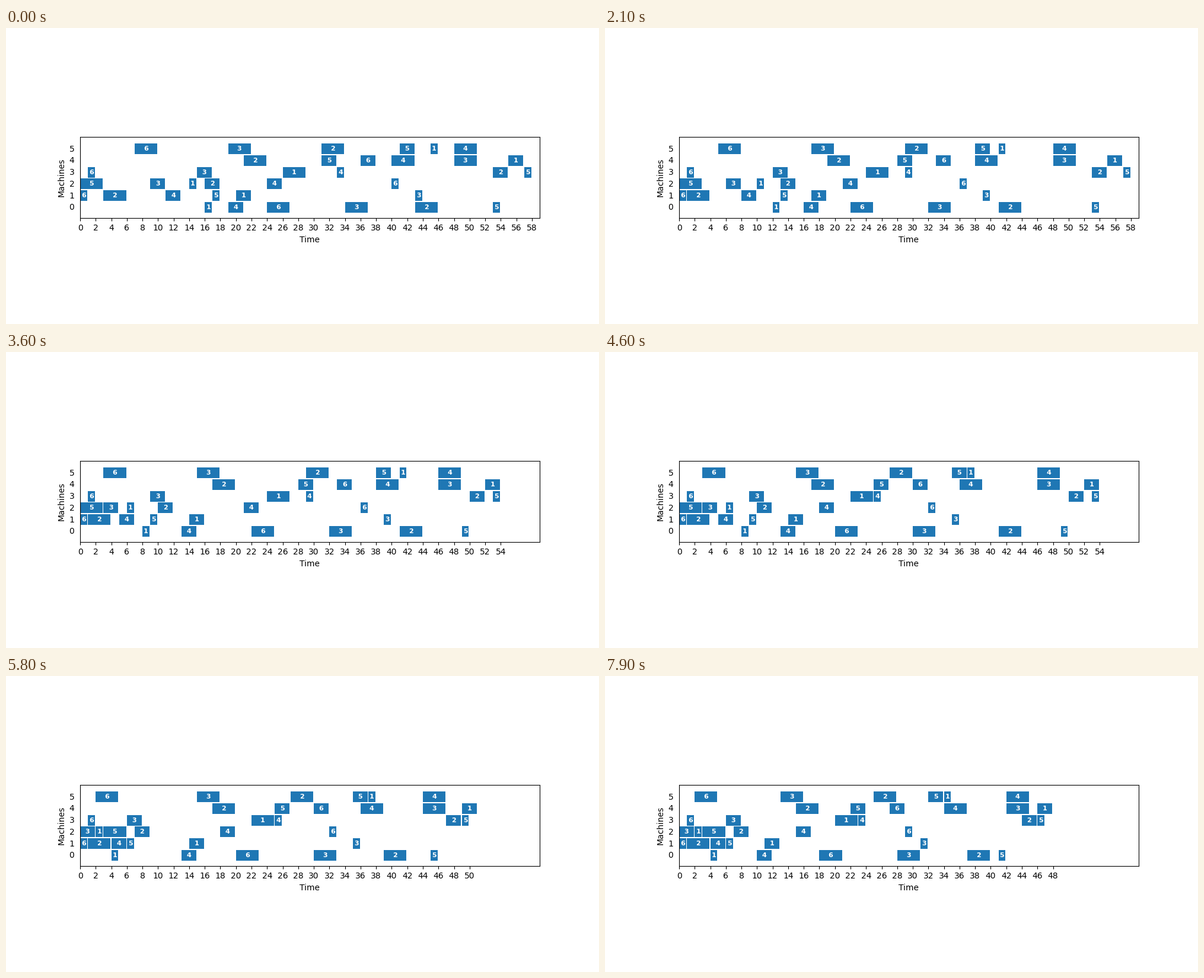
Animation of 1000x500 px, one loop 8 s. Source, as a matplotlib script:

```python
import matplotlib.pyplot as plt
from matplotlib.animation import FuncAnimation
from matplotlib.patches import Rectangle

FRAMES = 80
WINDOW = 5
GAP = 0.1

# one row per machine, one column per job
BEGIN = [
    [16, 43, 34, 19, 53, 24],
    [20, 3, 43, 11, 17, 0],
    [14, 16, 9, 24, 0, 40],
    [26, 53, 15, 33, 57, 1],
    [55, 21, 48, 40, 31, 36],
    [45, 31, 19, 48, 41, 7],
]
LENGTH = [
    [1, 3, 3, 2, 1, 3],
    [2, 3, 1, 2, 1, 1],
    [1, 2, 2, 2, 3, 1],
    [3, 2, 2, 1, 1, 1],
    [2, 3, 3, 3, 2, 2],
    [1, 3, 3, 3, 2, 3],
]
TASKS = [(m, job, dur) for m, row in enumerate(LENGTH)
         for job, dur in enumerate(row, 1)]
START = sum(BEGIN, [])


def ends(starts):
    return [s + dur for s, (_, _, dur) in zip(starts, TASKS)]


def pull_left(starts, i, low):
    """Move task i as early as the window allows; it may overtake longer tasks."""
    machine, job, dur = TASKS[i]
    limit, passed = low, []
    for k, (m, j, d) in enumerate(TASKS):
        if starts[k] >= starts[i] or (m != machine and j != job):
            continue
        if m == machine and starts[k] >= low and d > dur:
            passed.append(k)
        else:
            limit = max(limit, starts[k] + d)
    starts[i] = limit
    for k in passed:
        starts[k] = max(starts[k], limit + dur)


def schedules(count):
    """Sweep a window over the plan again and again, keeping every change."""
    states = [START]
    while len(states) < count:
        for end in range(1, max(ends(states[-1])) + 1):
            starts = states[-1][:]
            due = [i for i, e in enumerate(ends(starts)) if e == end]
            for i in due:
                pull_left(starts, i, max(0, end - WINDOW))
            if starts != states[-1]:
                states.append(starts)
    return states[:count]


STATES = schedules(FRAMES)

fig, ax = plt.subplots(figsize=(10, 5), dpi=100)
ax.set_xlim(0, max(ends(START)) + 1)
ax.set_ylim(-1, len(BEGIN))
ax.set_aspect(1.5)
ax.set_yticks(range(len(BEGIN)))
ax.tick_params(axis="y", left=False)
ax.set_xlabel("Time", x=0.499)
ax.set_ylabel("Machines")

bars, labels = [], []
for machine, job, dur in TASKS:
    bar = Rectangle((0, machine - 0.5), dur - GAP, 1 - GAP, color="#1f77b4", lw=0)
    bars.append(ax.add_patch(bar))
    labels.append(ax.text(0, machine - GAP / 2, str(job), color="white",
                          size=8, weight="bold", ha="center", va="center"))


def draw(frame):
    starts = STATES[frame]
    for bar, label, start in zip(bars, labels, starts):
        bar.set_x(start)
        label.set_x(start + bar.get_width() / 2)
    ax.set_xticks(range(0, max(ends(starts)) + 1, 2))
    return bars + labels


anim = FuncAnimation(fig, draw, frames=FRAMES, interval=100,
                     repeat=True, repeat_delay=0, blit=False)
plt.show()
```
